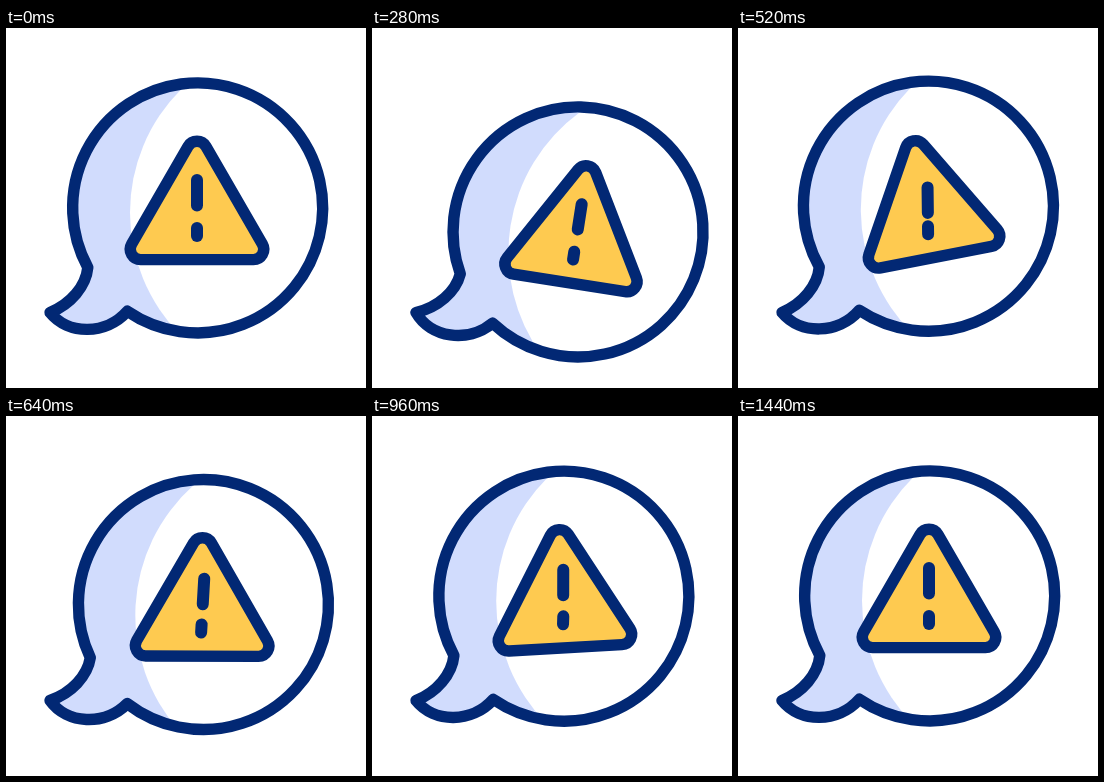
Recreate the animation shown at these times as an HTML page. Size 360 px wide and 360 px high, loop 1480 ms.

```html
<!DOCTYPE html>
<html lang="en">
<head>
<meta charset="utf-8">
<title>Warning bubble</title>
<style>
  html, body { margin: 0; width: 100%; height: 100%; overflow: hidden; background: #fff; }
  svg { display: block; width: 100vw; height: 100vh; }
  .line { stroke: #022874; stroke-width: 11.4; stroke-linecap: round; stroke-linejoin: round; }
  .mark { stroke-width: 12; }
</style>
</head>
<body>
<svg viewBox="0 0 360 360">
  <defs>
    <clipPath id="disc"><circle cx="191.6" cy="179.8" r="125"/></clipPath>
  </defs>
  <g id="bubble">
    <path id="shade" fill="#d1dcfd"/>
    <circle cx="298" cy="184.5" r="174" fill="#fff" clip-path="url(#disc)"/>
    <path id="rim" class="line" fill="none"/>
    <path id="sign" class="line" fill="#feca50"/>
    <path id="bar" class="line mark" d="M191 152V177.5"/>
    <path id="dot" class="line mark" d="M191 200V208"/>
  </g>
</svg>
<script>
const LOOP = 1480, STEP = 40, HALF = 210;
const $ = id => document.getElementById(id);
const [bubble, sign, bar, dot] = ['bubble', 'sign', 'bar', 'dot'].map($);

const outline = 'M121.3 283.2A125 125 0 1 0 81.8 239.5' +
  'C80 258 65 276 44 284.5C62 307.2 100 307.2 121.3 283.2Z';
$('shade').setAttribute('d', outline);
$('rim').setAttribute('d', outline);

// Rounded equilateral triangle: an arc at each corner.
function triangle(cx, cy, reach, r) {
  const at = (corner, side) => {
    const a = corner * Math.PI / 180, b = (corner + side) * Math.PI / 180;
    return (cx + reach * Math.cos(a) + r * Math.cos(b)).toFixed(2) + ' ' +
           (cy + reach * Math.sin(a) + r * Math.sin(b)).toFixed(2);
  };
  return 'M' + [-90, 30, 150]
    .map(c => `${at(c, -60)}A${r} ${r} 0 0 1 ${at(c, 60)}`).join('L') + 'Z';
}
sign.setAttribute('d', triangle(191, 188.7, 65.2, 10.3));

const clamp = x => Math.min(1, Math.max(0, x));

// Swing out to a peak, snap back through zero, then ring down.
function swing(t, m) {
  if (t <= m.start) return 0;
  if (t < m.top) return m.peak * (1 - Math.cos(Math.PI * (t - m.start) / (m.top - m.start))) / 2;
  if (t < m.snap) return m.peak * (1 - ((t - m.top) / (m.snap - m.top)) ** 2);
  const s = t - m.snap;
  const ring = Math.exp(-m.decay * s / 1000) * Math.sin(Math.PI * s / HALF);
  return -m.size * ring * clamp((1440 - t) / 240);
}

const tilt  = { start: 80,  top: 275,  snap: 317,  peak: 9,  size: 19.5,  decay: 5.5 };
const rock  = { start: 340, top: 410,  snap: 454,  peak: 5,  size: 15,    decay: 2.9 };
const drop  = { start: 340, top: 410,  snap: 453,  peak: -4, size: -14.6, decay: 4.5 };
const twist = { start: 920, top: 1110, snap: 1160, peak: 18, size: 26,    decay: 8 };

const turn = (el, deg, x, y) => el.setAttribute('transform', `rotate(${deg.toFixed(3)} ${x} ${y})`);

function draw(t) {
  turn(bubble, swing(t, tilt), 44, 284.5);
  turn(sign, swing(t, rock), 191, 188.7);
  bar.setAttribute('transform', `translate(0 ${swing(t, drop).toFixed(3)})`);
  turn(dot, swing(t, twist), 191, 204);
}

let begin;
function tick(now) {
  if (begin === undefined) begin = now;
  const t = (now - begin) % LOOP;
  draw(Math.floor(t / STEP) * STEP);
  requestAnimationFrame(tick);
}
draw(0);
requestAnimationFrame(tick);
</script>
</body>
</html>
```
